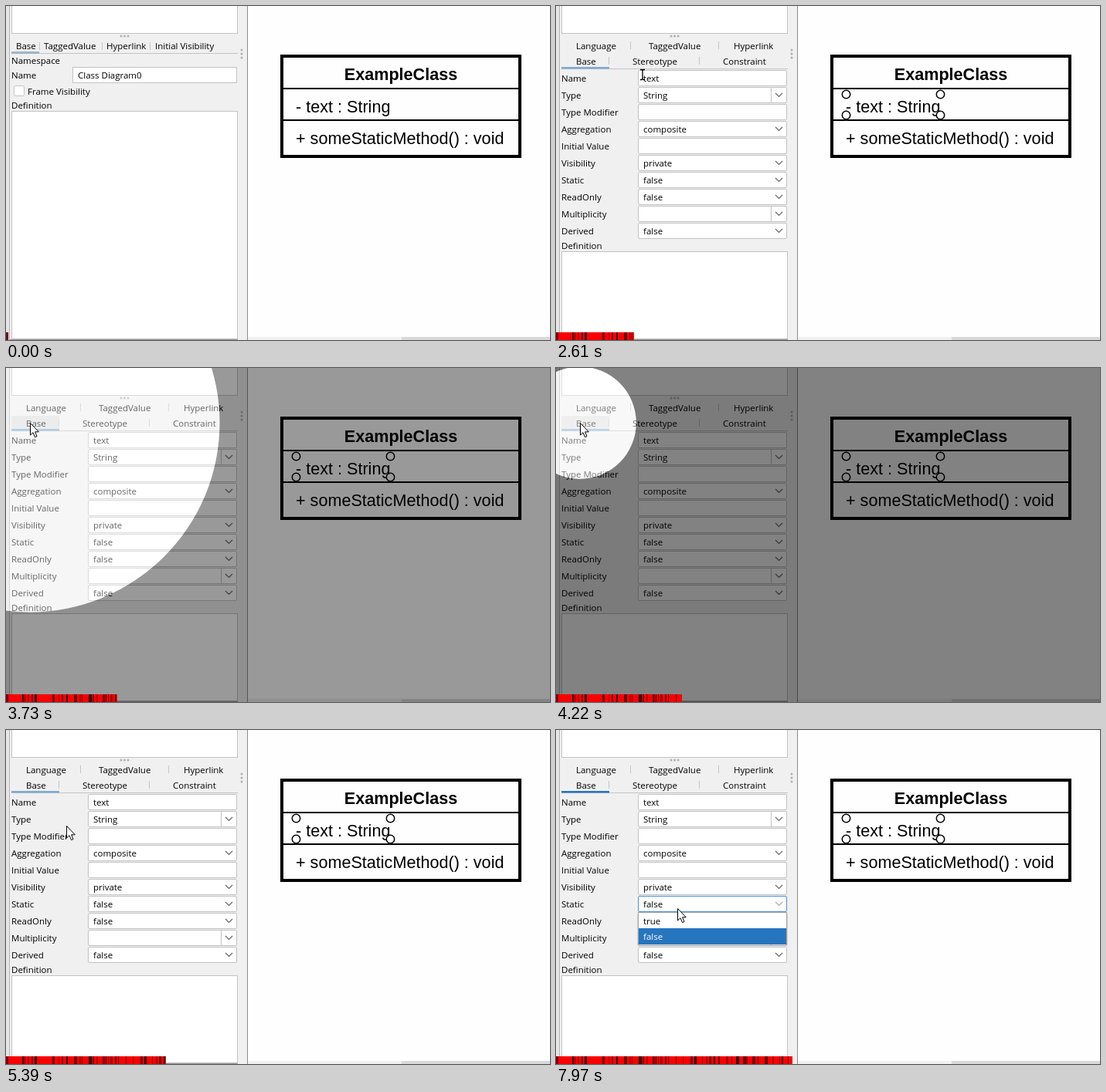
Animation, 704 px wide and 433 px high, one loop 8 s. Source, as an HTML page:

```html
<!DOCTYPE html>
<html lang="en">
<head>
<meta charset="utf-8">
<title>Class attribute editor</title>
<style>
  html, body { margin: 0; width: 100%; height: 100%; overflow: hidden; background: #fefefe; }
  svg { display: block; }
  .ui text { font: 11.5px "Open Sans", "Noto Sans", sans-serif; fill: #000; white-space: pre; }
  .uml text { font: 21.6px "Liberation Sans", Arial, sans-serif; }
  .uml .title { font-weight: bold; }
  .ui .picked { fill: #fff; }
</style>
</head>
<body>
<svg id="stage" width="704" height="433" viewBox="0 0 704 433"></svg>
<script>
const LOOP = 8000;
const SELECT_AT = 1330;
const OPEN_AT = 7600;

// Markup helpers
const rect = (x, y, w, h, fill, extra = '') =>
  `<rect x="${x}" y="${y}" width="${w}" height="${h}" fill="${fill}" ${extra}/>`;
const box = (x, y, w, h, extra = '', stroke = '#c2c2c2') =>
  rect(x + .5, y + .5, w - 1, h - 1, '#fff', `stroke="${stroke}" ${extra}`);
const text = (x, y, s, cls = '') => `<text x="${x}" y="${y}" class="${cls}">${s}</text>`;
const line = (x1, y1, x2, y2, color, width = 1) =>
  `<path d="M${x1} ${y1}L${x2} ${y2}" stroke="${color}" stroke-width="${width}"/>`;
const dot = (x, y) => `<circle cx="${x}" cy="${y}" r="1.5" fill="#b0b0b0"/>`;
const separator = (x, y) => line(x + .5, y - 5, x + .5, y + 5, '#c4c4c4');
const chevron = (y, id = '') =>
  `<path ${id} d="M284 ${y - 2}l4.5 4.5l4.5 -4.5" fill="none" stroke="#666" stroke-width="1.2"/>`;

function diagramPanel() {
  return line(7, 61.5, 300, 61.5, '#c4c4c4') + rect(7, 59, 36, 3, '#9fb4c6') +
    text(13, 56, 'Base') + text(49, 56, 'TaggedValue') +
    text(130, 56, 'Hyperlink') + text(193, 56, 'Initial Visibility') +
    [43, 124, 186].map(x => separator(x, 52)).join('') +
    text(7, 75, 'Namespace') + text(7, 94, 'Name') +
    box(86, 79, 213, 21) + text(93, 94, 'Class Diagram0') +
    box(10, 103, 14, 14, 'rx="2"') + text(28, 115, 'Frame Visibility') +
    text(7, 133, 'Definition') + box(7, 136, 293, 296);
}

// label, value, kind
const ROWS = [
  ['Name', 'text', 'field'], ['Type', 'String', 'editable'],
  ['Type Modifier', '', 'field'], ['Aggregation', 'composite', 'combo'],
  ['Initial Value', '', 'field'], ['Visibility', 'private', 'combo'],
  ['Static', 'false', 'combo'], ['ReadOnly', 'false', 'combo'],
  ['Multiplicity', '', 'editable'], ['Derived', 'false', 'combo'],
];

function formRow([label, value, kind], i) {
  const y = 83 + 22 * i;
  const isStatic = label === 'Static';
  return text(7, y + 15, label) +
    box(106, y, 193, 21, `rx="1.5" ${isStatic ? 'id="staticBox"' : ''}`) +
    text(113, y + 15, value) +
    (kind === 'editable' ? line(278.5, y, 278.5, y + 21, '#c2c2c2') : '') +
    (kind === 'field' ? '' : chevron(y + 10, isStatic ? 'id="staticArrow"' : ''));
}

function attributePanel() {
  return rect(7, 62, 62, 19, '#dedede', 'id="tabHover"') +
    line(7, 81.5, 300, 81.5, '#c4c4c4') + rect(7, 79, 62, 2.5, '#7ea9d3', 'id="tabLine"') +
    text(26, 56, 'Language') + text(120, 56, 'TaggedValue') + text(230, 56, 'Hyperlink') +
    text(26, 76, 'Base') + text(99, 76, 'Stereotype') + text(216, 76, 'Constraint') +
    separator(96, 51) + separator(210, 51) + separator(68, 71) + separator(185, 71) +
    ROWS.map(formRow).join('') +
    text(7, 315, 'Definition') + box(7, 318, 293, 114) +
    `<g id="dropdown">` +
    rect(105, 238, 195, 42, '#000', 'opacity=".13" rx="2"') +
    box(106, 236, 193, 42, '', '#a4a4a4') + text(113, 252, 'true') +
    rect(107, 257, 191, 21, '#2675bf') + text(113, 272, 'false', 'picked') + `</g>`;
}

function classBox() {
  const handles = [[375, 114.5], [497, 114.5], [375, 141.5], [497, 141.5]].map(([x, y]) =>
    `<circle cx="${x + .5}" cy="${y}" r="5.2" fill="#fff" stroke="#000" stroke-width="1.5"/>`);
  return rect(357, 65, 308, 130, '#fefefe', 'stroke="#000" stroke-width="4"') +
    line(357, 107, 665, 107, '#000', 2) + line(357, 148, 665, 148, '#000', 2) +
    `<text x="511" y="96" text-anchor="middle" class="title">ExampleClass</text>` +
    text(375, 138, '- text : String') + text(375, 179, '+ someStaticMethod() : void') +
    `<g id="handles">${handles.join('')}</g>` +
    `<g id="anchors">` +
    line(313, 130, 334, 130, '#666', 4) +
    `<path d="M338 122H355V123L347 137Z" fill="#5a5a5a"/>` +
    `<path d="M646 98l9 9.3l-9 9.3l-9 -9.3z" fill="#fdbb3c"/>` +
    rect(638, 145, 15, 7, '#0b9063') + `</g>`;
}

function stripes() {
  let seed = 29;
  const random = () => (seed = seed * 16807 % 2147483647) / 2147483647;
  const marks = [[0, 3], [21, 2], [24, 1], [28, 2], [33, 2], [37, 3], [60, 3],
                 [68, 1], [72, 2], [78, 2], [88, 4], [95, 2]];
  for (let x = 98; x < 310; x += 3 + random() * 7) marks.push([Math.round(x), 1 + Math.floor(random() * 4)]);
  const shades = ['#700018', '#300', '#600', '#a00'];
  return rect(0, 0, 320, 10, '#fb0000') +
    marks.map(([x, w], i) => rect(x, 0, w, 10, shades[i % 4])).join('');
}

document.getElementById('stage').innerHTML =
  rect(0, 0, 704, 433, '#fefefe') +
  `<g class="ui">` + rect(0, 0, 313, 433, '#f0f0f0') +
  rect(0, 0, 4, 433, '#e6e6e6') + line(4.5, 0, 4.5, 433, '#b4b4b4') +
  line(312.5, 0, 312.5, 433, '#8c8c8c') +
  box(7, -5, 293, 41) + [149, 153.5, 158].map(x => dot(x, 39)).join('') +
  [57, 62, 67].map(y => dot(305, y)).join('') +
  `<g id="diagram">${diagramPanel()}</g><g id="attribute">${attributePanel()}</g>` +
  line(5, 432.5, 300, 432.5, '#999') + `</g>` +
  rect(313, 429, 199, 4, '#f0f0f0') + rect(512, 429, 192, 4, '#d9d9d9') +
  `<g class="uml">${classBox()}</g>` +
  `<g id="spotlight"><path id="shade" fill-rule="evenodd"/>` +
  `<circle id="glow" cx="31" cy="71" fill="#fff"/></g>` +
  `<svg id="progress" x="0" y="423" height="10" overflow="hidden">${stripes()}</svg>` +
  `<g id="pointer"><path id="arrow" d="M.5 .5V16L4 12.7L6.5 18.6L9 17.5L6.6 11.8H11.3Z" fill="#fff" stroke="#000"/>` +
  `<path id="beam" d="M-3 -6.5H-1L0 -5.5L1 -6.5H3M0 -5.5V5.5M-3 6.5H-1L0 5.5L1 6.5H3" fill="none" stroke="#000" stroke-width="1.3"/></g>`;

const el = Object.fromEntries([...document.querySelectorAll('[id]')].map(e => [e.id, e]));
const show = (e, on) => e.setAttribute('visibility', on ? 'inherit' : 'hidden');
const set = (e, attrs) => { for (const k in attrs) e.setAttribute(k, attrs[k]); };
const clamp = u => Math.min(1, Math.max(0, u));

// Pointer moves: start, end, then the from, bend and to points of a curve
const MOVES = [
  [120, 920, [520, 221], [490, 177], [460, 133]],
  [2290, 2740, [460, 133], [246, 123], [31, 71]],
  [4832, 6235, [31, 71], [135, 148], [31, 223]],
  [6750, 7400, [31, 223], [95, 230], [157, 231]],
];

function pointerAt(t) {
  const [start, end, a, b, c] = MOVES.findLast(m => t >= m[0]) || MOVES[0];
  const s = (1 - Math.cos(Math.PI * clamp((t - start) / (end - start)))) / 2;
  return [0, 1].map(k => (1 - s) ** 2 * a[k] + 2 * s * (1 - s) * b[k] + s * s * c[k]);
}

function overTextField(x, y) {
  const row = ROWS[Math.floor((y - 83) / 22)];
  return x > 106 && x < 298 && !!row && (row[2] === 'field' || row[2] === 'editable' && x < 278);
}

// The ring closes in on the pointer while the shade darkens, then both reverse
function drawSpotlight(t) {
  const pulse = Math.sin(Math.PI * clamp((t - 3350) / 1400));
  const r = 1000 * (1 - pulse);
  show(el.spotlight, pulse > .001);
  set(el.spotlight, { 'fill-opacity': .53 * pulse });
  set(el.glow, { r });
  set(el.shade, { d: `M-1000 -1000H1100V1100H-1000ZM${31 - r} 71a${r} ${r} 0 1 0 ${2 * r} 0a${r} ${r} 0 1 0 ${-2 * r} 0Z` });
}

function draw(t) {
  const [x, y] = pointerAt(t);
  const selected = t >= SELECT_AT, open = t >= OPEN_AT;
  show(el.diagram, !selected);
  show(el.attribute, selected);
  show(el.handles, selected);
  show(el.anchors, !selected && t > 120 && y < 196);
  show(el.tabHover, selected && x > 7 && x < 69 && y > 61 && y < 81);
  show(el.dropdown, selected && open);
  set(el.tabLine, { fill: open ? '#2675bf' : '#7ea9d3' });
  set(el.staticBox, { stroke: open ? '#4a94d6' : '#c2c2c2' });
  set(el.staticArrow, { stroke: t > 6700 && x > 106 ? '#aaa' : '#666' });
  drawSpotlight(t);
  set(el.progress, { width: Math.max(3, Math.round(1.5 + .0382 * t)) });
  const beam = selected && overTextField(x, y);
  show(el.pointer, t >= 70);
  show(el.arrow, !beam);
  show(el.beam, beam);
  set(el.pointer, { transform: `translate(${Math.round(x)} ${Math.round(y)})` });
}

const origin = performance.now();
function tick() {
  draw((performance.now() - origin) % LOOP);
  requestAnimationFrame(tick);
}
tick();
</script>
</body>
</html>
```
